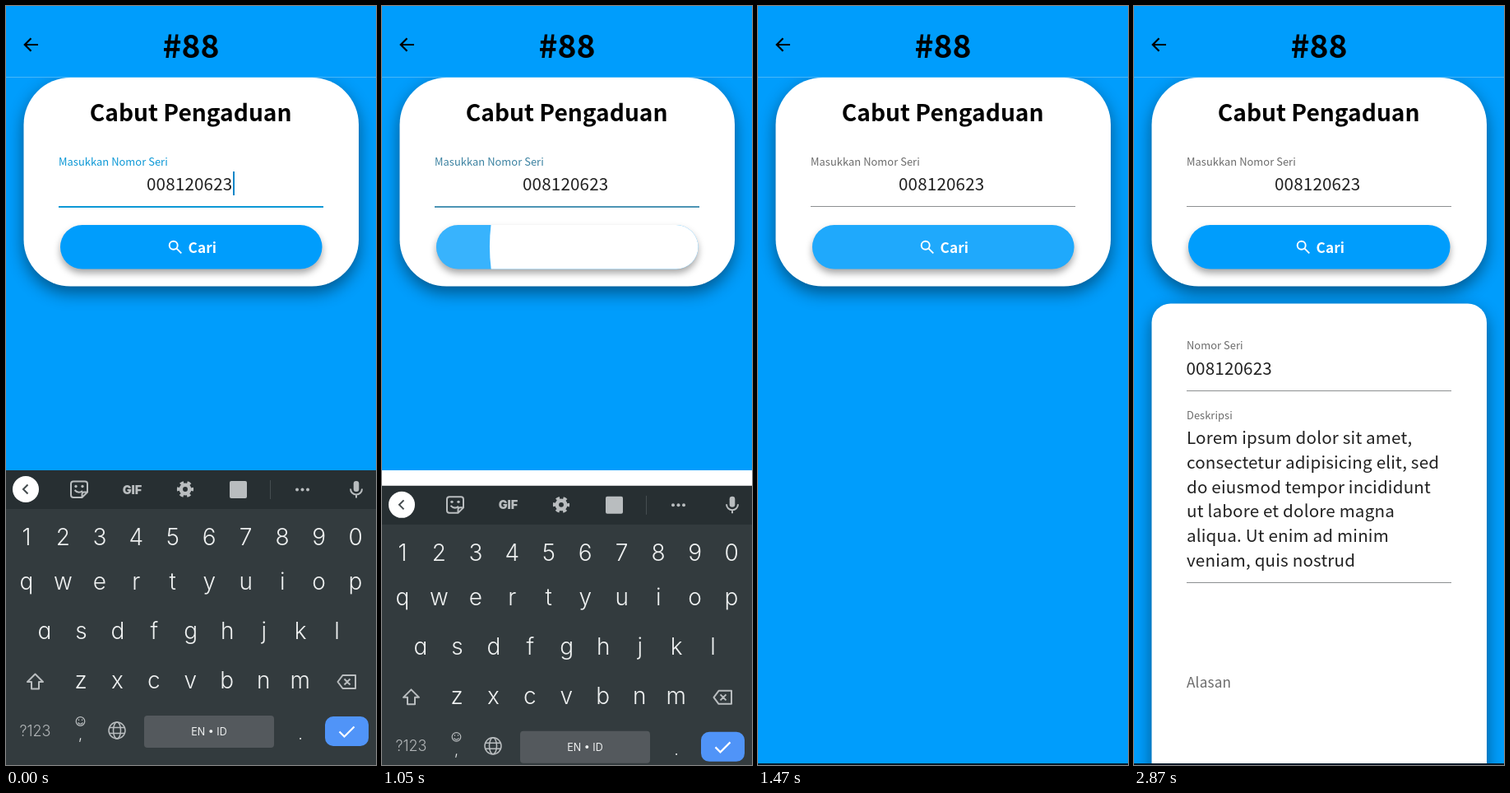
An HTML page for the animation above (3360 ms loop, 450 px wide and 922 px high).

```html
<!DOCTYPE html>
<html lang="id">
<head>
<meta charset="utf-8">
<title>Cabut Pengaduan</title>
<style>
html, body { margin: 0; width: 100%; height: 100%; overflow: hidden; background: #009dfc; }
svg { display: block; width: 450px; height: 922px; }
text { font-family: "Noto Sans CJK JP", "Noto Sans CJK SC", "Noto Sans CJK KR", "Noto Sans CJK", "Noto Sans", sans-serif; }
.mid { text-anchor: middle; }
.body { font-size: 20.6px; letter-spacing: .17px; fill: #212121; }
.label { font-size: 12.9px; letter-spacing: .05px; fill: #6c6c6c; }
.card { fill: #fff; filter: drop-shadow(0 8px 10px rgba(0,0,0,.45)); }
.rule { fill: #8c8f91; }
.line { fill: none; stroke: #b9bdbf; stroke-width: 2; }
.icon { fill: #b9bdbf; }
#keyboard text { font-family: Inter, Lato, sans-serif; font-weight: 300; font-feature-settings: "cv11"; text-anchor: middle; fill: #eef0f0; }
#keys text { font-size: 28px; }
</style>
</head>
<body>
<svg viewBox="0 0 450 922">
  <defs>
    <clipPath id="pill"><rect x="66" y="266" width="318.5" height="53.5" rx="26.75"/></clipPath>
  </defs>
  <rect width="450" height="922" fill="#009dfc"/>

  <rect class="card" x="21.5" y="87" width="407.5" height="253.5" rx="57"/>
  <rect width="450" height="86" fill="#009dfc"/>
  <rect y="86" width="450" height="1" fill="#48b6f8"/>
  <path d="M39 47H23M30.5 39.3l-7.7 7.7 7.7 7.7" fill="none" stroke="#000" stroke-width="2.2"/>
  <text class="mid" x="225" y="63" font-size="39" font-weight="700">#88</text>
  <text class="mid" x="224.7" y="140" font-size="28.2" font-weight="700">Cabut Pengaduan</text>

  <text class="label" id="label" x="64" y="193.5">Masukkan Nomor Seri</text>
  <text class="body mid" x="223.2" y="224">008120623</text>
  <rect id="caret" x="276" y="201" width="2" height="29" fill="#0c86c8"/>
  <rect id="underline" x="64" y="243" width="322"/>

  <rect x="66" y="266" width="318.5" height="53.5" rx="26.75" fill="#009dfc" style="filter:drop-shadow(0 5px 4px rgba(0,0,0,.35))"/>
  <g clip-path="url(#pill)" fill="#fff">
    <rect id="glow" x="66" y="266" width="319" height="54"/>
    <circle id="ripple" cx="349" cy="292"/>
  </g>
  <g fill="none" stroke="#fff" stroke-width="1.9">
    <circle cx="203.7" cy="290.7" r="5"/>
    <path d="M207.3 294.3l6 6"/>
  </g>
  <text x="221.5" y="299.5" font-size="17.2" font-weight="700" letter-spacing=".1" fill="#fff">Cari</text>

  <g id="result">
    <rect class="card" x="21.5" y="361.5" width="407.5" height="620" rx="23"/>
    <text class="label" x="64" y="416.7">Nomor Seri</text>
    <text class="body" x="63.5" y="448">008120623</text>
    <rect class="rule" x="64" y="467" width="322" height="1"/>
    <text class="label" x="64" y="501.7">Deskripsi</text>
    <g id="lorem"></g>
    <rect class="rule" x="64" y="700" width="322" height="1"/>
    <text x="64" y="828" font-size="17.2" letter-spacing=".15" fill="#6c6c6c">Alasan</text>
  </g>
  <rect y="920" width="450" height="2" fill="#051a2a"/>
  <rect id="gap" y="564" width="450" height="358" fill="#fff"/>

  <g id="keyboard">
    <rect y="564" width="450" height="370" fill="#333b3e"/>
    <rect y="564" width="450" height="47" fill="#272f32"/>
    <circle cx="24" cy="587" r="16" fill="#fff"/>
    <path id="chevron" d="M26.5 581.5l-5.5 5.5 5.5 5.5" fill="none" stroke="#444b4e" stroke-width="2"/>
    <g class="line">
      <rect x="422.7" y="577" width="6.6" height="13" rx="3.3" class="icon" stroke="none"/>
      <path d="M419 586.5a7 7 0 0 0 14 0M426 593.5v4"/>
    </g>
    <g id="tools">
      <path class="line" d="M82 577.5h14q3 0 3 3v10l-6.5 6.5H82q-3 0-3-3v-13.500q0-3 3-3zM99 590.500h-4q-2.500 0-2.500 2.500v4M83.500 588q4.500 5 9.500 1"/>
      <circle class="icon" cx="85" cy="583.500" r="1.700"/>
      <circle class="icon" cx="93" cy="583.500" r="1.700"/>
      <text x="153.500" y="592.500" style="font-size:14.500px;font-weight:900;fill:#b9bdbf">GIF</text>
      <circle cx="218" cy="587" r="5.200" class="line" stroke-width="4" style="stroke-width:4.500"/>
      <circle cx="218" cy="587" r="8.300" class="line" style="stroke-width:3.600" stroke-dasharray="4.400 4.291" stroke-dashoffset="2.200"/>
      <rect class="icon" x="272" y="577" width="21" height="21" rx="2"/>
      <rect x="321" y="576" width="1" height="23" fill="#454d50"/>
      <g class="icon"><circle cx="354" cy="587.500" r="2"/><circle cx="360.500" cy="587.500" r="2"/><circle cx="367" cy="587.500" r="2"/></g>
    </g>
    <g id="keys"></g>
    <g class="line" stroke-linejoin="round">
      <path d="M35.500 811.500l-9.500 9.500h5v8.500h9v-8.500h5z"/>
      <path d="M409.500 813h15.500v16h-15.500l-6-8zM411.500 817.500l7 7m0-7l-7 7"/>
      <g style="stroke-width:1.500">
        <circle cx="135" cy="880" r="10"/>
        <ellipse cx="135" cy="880" rx="4.500" ry="10"/>
        <path d="M126 876.500h18M126 883.500h18"/>
      </g>
      <g style="stroke-width:1.200">
        <circle cx="90.500" cy="869" r="5.300"/>
        <path d="M87.500 870.500q3 3.500 6 0M88.500 866.500v1.500M92.500 866.500v1.500"/>
      </g>
    </g>
    <text x="35.500" y="886.500" style="font-size:18px;fill:#b1b5b7">?123</text>
    <text x="90.500" y="891" font-size="18">,</text>
    <rect x="168" y="862" width="158" height="39" rx="4" fill="#54595d"/>
    <text x="247" y="886" font-size="12.500" style="font-weight:400">EN • ID</text>
    <text x="358" y="891" font-size="20">.</text>
    <rect x="388" y="863" width="53" height="36" rx="10" fill="#5094f8"/>
    <path d="M405.500 881.500l6 6 12-12" fill="none" stroke="#fff" stroke-width="2.200"/>
  </g>
</svg>
<script>
const LOOP = 3360, STEP = 70;
const el = id => document.getElementById(id);
const ramp = (t, from, to) => Math.min(1, Math.max(0, (t - from) / (to - from)));
const smooth = p => p * p * (3 - 2 * p);
const show = (id, on) => el(id).setAttribute('visibility', on ? 'visible' : 'hidden');
const set = (id, attrs) => {
  for (const name in attrs) el(id).setAttribute(name, attrs[name]);
};
const mix = (a, b, p) => `rgb(${a.map((v, i) => Math.round(v + (b[i] - v) * p))})`;

// Key rows: characters, first centre, baseline
el('keys').innerHTML = [
  ['1234567890', 25, 655],
  ['qwertyuiop', 25, 709],
  ['asdfghjkl', 47, 769],
  ['zxcvbnm', 91, 829]
].map(([row, x, y]) => [...row].map((c, i) =>
  `<text x="${x + i * 44.45}" y="${y}">${c}</text>`).join('')).join('');

el('lorem').innerHTML = [
  'Lorem ipsum dolor sit amet,',
  'consectetur adipisicing elit, sed',
  'do eiusmod tempor incididunt',
  'ut labore et dolore magna',
  'aliqua. Ut enim ad minim',
  'veniam, quis nostrud'
].map((s, i) => `<text class="body" x="64" y="${532 + i * 29.83}">${s}</text>`).join('');

function draw(t) {
  show('caret', t < 490);

  const blur = ramp(t, 980, 1120);
  el('label').style.fill = mix([12, 152, 214], [108, 108, 108], blur);
  set('underline', {
    fill: mix([12, 152, 214], [140, 143, 145], blur),
    height: blur < 1 ? 2 : 1
  });

  // The press spreads white over the button, then fades
  const fade = 1 - ramp(t, 1290, 1490);
  set('glow', { opacity: 0.22 * ramp(t, 775, 1050) * fade });
  set('ripple', {
    r: Math.max(0, 0.79 * (t - 774)),
    opacity: ramp(t, 770, 1050) * fade
  });

  const drop = 358 * smooth(ramp(t, 1018, 1248));
  const collapsed = t >= 1190;
  set('keyboard', { transform: `translate(0 ${drop})` });
  set('chevron', { transform: collapsed ? 'rotate(180 24 587)' : '' });
  show('keyboard', drop < 358);
  show('tools', !collapsed && drop < 358);
  show('gap', t < 1120);
  show('result', t >= 1540);
}

function tick() {
  draw(Math.floor(performance.now() % LOOP / STEP) * STEP);
  requestAnimationFrame(tick);
}
tick();
</script>
</body>
</html>
```
